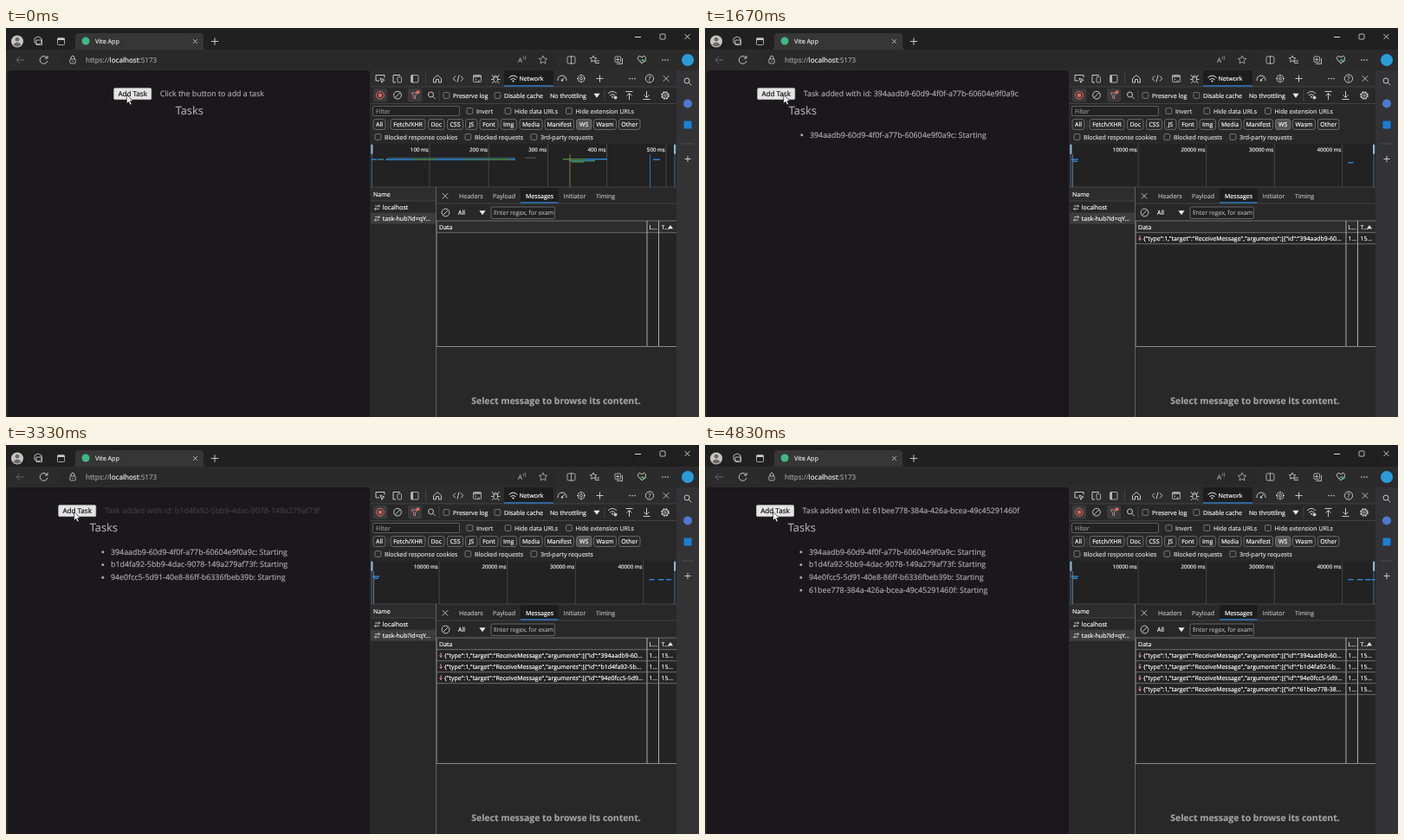
Animation, 800 px wide and 450 px high, one loop 5000 ms. Source, as an HTML page:

```html
<!DOCTYPE html>
<html lang="en">
<head>
<meta charset="utf-8">
<title>Task list with network panel</title>
<style>
  html, body { margin: 0; width: 100%; height: 100%; overflow: hidden; background: #1a181b; }
  svg { display: block; width: 100vw; height: 100vh; }
  text { font-family: "Open Sans", "Noto Sans", sans-serif; text-rendering: geometricPrecision; white-space: pre; }
</style>
</head>
<body>
<svg id="stage" viewBox="0 0 800 450">
  <g id="chrome"></g>
  <g id="live"></g>
</svg>
<script>
const BLUE = '#2b88e0', TEAL = '#3f8f8a', GREEN = '#4c8a45', LINE = '#4a4a4a', ICON = '#c8c8c8', PAGE_TEXT = '#aba9ab';

// A hairline stroke in the fill colour gives the slightly heavy look of small screen text.
const text = (x, y, s, fill = '#dcdcdc', size = 7.05, more = '') =>
  `<text x="${x}" y="${y}" fill="${fill}" stroke="${fill}" stroke-width=".18" font-size="${size}" ${more}>${s}</text>`;
const rect = (x, y, w, h, fill, stroke = 'none', r = 0) =>
  `<rect x="${x}" y="${y}" width="${w}" height="${h}" fill="${fill}" stroke="${stroke}" stroke-width=".8" rx="${r}"/>`;
const path = (d, stroke = ICON, width = 1, fill = 'none') =>
  `<path d="${d}" stroke="${stroke}" stroke-width="${width}" fill="${fill}" stroke-linejoin="round"/>`;
const dot = (x, y, r, fill = 'none', stroke = 'none', width = 1) =>
  `<circle cx="${x}" cy="${y}" r="${r}" fill="${fill}" stroke="${stroke}" stroke-width="${width}"/>`;
const hline = (x1, x2, y, color = LINE) => path(`M${x1} ${y}H${x2}`, color, .8);
const vline = (x, y1, y2, color = LINE) => path(`M${x} ${y1}V${y2}`, color, .8);
const cross = (x, y, r, color = ICON) => path(`M${x - r} ${y - r}l${2 * r} ${2 * r}m0 ${-2 * r}l${-2 * r} ${2 * r}`, color, .9);
const plus = (x, y, r) => path(`M${x - r} ${y}h${2 * r}M${x} ${y - r}v${2 * r}`);
const dots = (x, y) => [-3, 0, 3].map(d => dot(x + d, y, .85, ICON)).join('');
const checkbox = (x, y, label, color) =>
  rect(x, y - 3.4, 6.8, 6.8, 'none', '#8c8c8c', 1.2) + text(x + 11, y + 2.5, label, color);
const search = (x, y) => dot(x - 1, y - 1, 3, 'none', ICON) + path(`M${x + 1.2} ${y + 1.2}l3 3`);
const gear = (x, y) => dot(x, y, 3.9, 'none', ICON, 1.8).replace('/>', ' stroke-dasharray="2 1.06"/>')
  + dot(x, y, 3.4, 'none', ICON, .8) + dot(x, y, 1.3, 'none', ICON, .8);
const clear = (x, y) => dot(x, y, 4.4, 'none', ICON) + path(`M${x + 3} ${y - 3}l-6 6`);
const caret = (x, y) => path(`M${x - 3.6} ${y - 2.3}h7.2l-3.6 5z`, 'none', 0, '#eee');
const wifi = (x, y, color) =>
  path(`M${x - 5} ${y - 1}q5 -4.8 10 0M${x - 3} ${y + 1.2}q3 -2.8 6 0`, color, 1) + dot(x, y + 3, 1, color);

function browserFrame() {
  return rect(0, 0, 800, 450, '#2b2b2b') + rect(0, 0, 800, 25, '#202020')
    + path('M76 25q4 0 4 -4V10q0 -4 4 -4H224q4 0 4 4V21q0 4 4 4z', 'none', 0, '#363636')
    + rect(63, 28, 573, 18, '#292929', 'none', 4)
    // window and tab row
    + dot(13, 15.5, 7, '#c9c5c2') + dot(13, 13.2, 2.4, '#6c6865') + path('M8.3 19.5q4.7 -6 9.4 0q-4.7 4 -9.4 0z', 'none', 0, '#6c6865')
    + path('M33 12l4 -2 4 2v5l-4 2 -4 -2zM35 14h6.5v5.5h-6.5z', ICON, .9)
    + rect(59.5, 11.5, 8, 8, 'none', ICON, 1) + path('M59.5 13h8', ICON, 2)
    + dot(92, 15, 4.5, '#41b883') + text(103, 17.8, 'Vite App', '#e2e2e2', 7.2)
    + cross(218.5, 15.5, 2.3) + plus(241, 15.5, 4.2)
    + path('M726 10.5h7', '#ddd') + rect(755, 7, 6, 6, 'none', '#ddd', 1) + cross(786.5, 10, 3, '#ddd')
    // address row
    + path('M21 37h-9m4 -4l-4 4 4 4', '#666') + path('M47.3 34.5a4.4 4.4 0 1 0 .6 3.5M48 32v3h-3')
    + rect(73.8, 36, 6.4, 5, 'none', ICON, 1) + path('M75 36v-2q2 -3.6 4 0v2M77 38v1')
    + text(92, 40, 'https://<tspan fill="#f0f0f0" stroke="#f0f0f0">localhost</tspan>:5173', '#a0a0a0', 8.1)
    + text(591, 40, 'A', '#aaa', 8) + path('M597 33q1.4 1 0 3M599 32q2 2 0 5', '#aaa', .7)
    + path(star(620, 37, 5), '#aaa', .9)
    + rect(648, 33, 9, 8, 'none', ICON, 1.3) + vline(652.5, 32, 42, ICON)
    + path(star(678, 36, 4), ICON, .9) + path('M680 38h5m-5 2.5h5', ICON, .9)
    + rect(703, 33, 6.5, 6.5, 'none', ICON, 1) + path('M705 41.5h6.5v-6.5M706.2 34.5v4m-2 -2h4', ICON, .9)
    + path('M734 41l-4 -4.2q-1.6 -4.3 2 -4.3l2 1.5 2 -1.5q3.6 0 2 4.3z') + path('M732 38h2l1 -2 1.5 4 1 -2h2', '#5bb978', 1)
    + dots(761, 37)
    // side bar
    + rect(774, 49, 26, 401, '#333335') + dot(787, 37, 7, '#2b9bd8')
    + search(787, 62) + dot(787, 87.5, 5, '#5078d0') + rect(782.5, 107.5, 9, 9, '#1a7fd4', 'none', 1)
    + hline(780, 794, 134, '#555') + plus(787, 151.5, 3.5)
    + path('M2 450V53q0 -4 4 -4H416q4 0 4 4V450z', 'none', 0, '#1a181b');
}

function star(x, y, r) {
  const points = Array.from({ length: 10 }, (_, i) => {
    const a = i * Math.PI / 5, d = i % 2 ? r * .48 : r;
    return `${x + d * Math.sin(a)} ${y - d * Math.cos(a)}`;
  });
  return `M${points.join('L')}z`;
}

function devToolbar() {
  return rect(421, 49, 353, 401, '#282828') + rect(421, 49, 353, 19, '#2c2c2c')
    + rect(575, 49, 57, 18, '#1d1d1d') + rect(575, 66.3, 57, 1.5, BLUE) + hline(421, 774, 68)
    + path('M431 61h-4v-6.5h10v3M432 58l5 2.3 -2.2 .8 -.8 2.2z')
    + path('M447 61v-6.5h8M450 63h-3v-2') + rect(452, 56.5, 4.5, 6.5, 'none', ICON, 1)
    + rect(467.5, 54.5, 8.5, 8.5, 'none', ICON, 1) + path('M469 54.5v8.5', ICON, 1.8) + vline(484.5, 52, 65)
    + path('M493.5 58.5l4.5 -4 4.5 4v4.5h-3v-3.5h-3v3.5h-3z')
    + path('M519 55.5l-2.7 3 2.7 3M525 55.5l2.7 3 -2.7 3M523 54.5l-2 8')
    + rect(539.5, 54.5, 9, 8, 'none', ICON, 1) + path('M539.5 56h9', ICON, 1.4) + path('M541.5 58.3l1.5 1.2 -1.5 1.2M544.5 61h2.5', ICON, .8)
    + path('M563 57h4.5v4q-2.2 3.5 -4.5 0zM563 57q2.2 -4 4.5 0M561 54l2 3M569.5 54l-2 3M560 59.5h3M567.5 59.5h3M561 64l2 -2M569.5 64l-2 -2', ICON, .9)
    + wifi(585.5, 58.5, '#eee') + text(592.5, 61, 'Network', '#f8f8f8')
    + path('M637 61q0 -6 5 -6t5 6M642 60l3 -3') + dot(642, 60.5, 1.2, ICON)
    + rect(660.5, 55, 7, 7, 'none', ICON, 2) + dot(664, 58.5, 1.5, 'none', ICON) + path('M664 53.5v1.5m0 7v1.5m-5 -5h1.5m7 0h1.5')
    + plus(685.5, 58.5, 4) + dots(723, 58.5)
    + dot(743, 58.5, 4.6, 'none', ICON) + text(741.4, 61, '?', ICON, 7) + cross(762, 58.5, 3.3)
    // recording controls
    + rect(424, 70, 16, 15.5, '#3b3b3b', 'none', 2) + dot(432, 77.7, 4.4, 'none', '#e46962') + rect(430, 75.7, 4, 4, '#e46962', 'none', 1)
    + clear(452, 77.7) + rect(464, 70, 16, 15.5, '#3b3b3b', 'none', 2)
    + path('M468 75h7l-2.5 3.2v3.6l-2 -1v-2.6z', '#c98b86', .9) + dot(475.5, 74.3, 2, '#e46962')
    + search(491.5, 78) + vline(500, 71, 85)
    + checkbox(505, 78, 'Preserve log', '#f4f4f4') + checkbox(564, 78, 'Disable cache', '#f4f4f4')
    + text(628, 80.5, 'No throttling', '#f4f4f4') + caret(682, 78) + vline(691, 71, 85)
    + wifi(700, 76.8, ICON) + dot(703.5, 80.5, 2, ICON)
    + path('M715.5 73.5h8M719.5 83v-7.5m-3 3l3 -3 3 3') + path('M735.5 82.5h8M739.5 73v7.5m-3 -3l3 3 3 -3')
    + gear(761, 78) + hline(421, 774, 87.5)
    // filters
    + rect(423.5, 90.5, 100, 11, '#222', '#6b6b6b', 1.5) + text(427, 98.8, 'Filter', '#8f8f8f')
    + checkbox(532, 96, 'Invert') + checkbox(576, 96, 'Hide data URLs') + checkbox(646.5, 96, 'Hide extension URLs')
    + checkbox(426, 126, 'Blocked response cookies') + checkbox(530, 126, 'Blocked requests') + checkbox(606, 126, '3rd-party requests')
    + [['All', 424, 438], ['Fetch/XHR', 444, 484], ['Doc', 487.5, 506], ['CSS', 509.5, 527.5], ['JS', 530.5, 544],
       ['Font', 547, 568], ['Img', 571, 589.5], ['Media', 593, 619], ['Manifest', 622, 655.5], ['WS', 658.5, 676],
       ['Wasm', 678.5, 704.5], ['Other', 707.5, 732]]
      .map(([label, a, b]) => rect(a, 105.5, b - a, 12, label === 'WS' ? '#555' : '#2b2b2b', '#777', 2.5)
        + text((a + b) / 2, 114, label, '#f8f8f8', 7, 'text-anchor="middle"')).join('')
    + vline(441, 106, 118) + rect(421, 134, 353, 50, '#222');
}

function requestPanels() {
  return rect(421, 184, 75, 16, '#2d2d2d') + text(424, 194.7, 'Name', '#f8f8f8') + hline(421, 496, 200)
    + rect(421, 213.7, 75, 13, '#3d3d3d')
    + [['localhost', 207.5], ['task-hub?id=qY...', 220.3]].map(([name, y]) => text(434.8, y + 2.5, name, '#f8f8f8')
      + path(`M426 ${y - 1.6}h5.5m-1.6 -1.6l1.6 1.6 -1.6 1.6M431 ${y + 1.8}h-5.5m1.6 -1.6l-1.6 1.6 1.6 1.6`, '#ddd', .8)).join('')
    + hline(421, 774, 184) + vline(496.5, 184, 450, '#707070')
    + rect(594, 185, 43.5, 17, '#1d1d1d') + rect(594, 201.3, 43.5, 1.5, BLUE) + hline(497, 774, 203)
    + cross(507, 194.3, 3.2)
    + [['Headers', 523], ['Payload', 562], ['Messages', 600], ['Initiator', 643.5], ['Timing', 681]]
      .map(([label, x]) => text(x, 196.7, label, label === 'Messages' ? '#fff' : '#b8b8b8')).join('')
    + clear(507.5, 213.5) + text(522, 216, 'All', '#f8f8f8') + caret(550, 213.5)
    + rect(560, 207, 73.5, 13.5, '#222', '#777', 1.5) + text(563, 216, 'Enter regex, for exam', '#a8a8a8', 6.95)
    // message table
    + rect(497, 223, 277, 145, '#242424') + rect(497, 223, 277, 13.5, '#2d2d2d')
    + hline(497, 774, 223, '#808080') + hline(497, 774, 236.7, '#808080') + hline(497, 774, 368.5, '#a0a0a0')
    + vline(497.3, 223, 368, '#808080') + vline(740, 223, 368, '#d0d0d0') + vline(753.5, 223, 368, '#d0d0d0')
    + text(500, 232.7, 'Data', '#f8f8f8') + text(742.5, 232.7, 'L...', '#f8f8f8') + text(756.5, 232.7, 'T...', '#f8f8f8')
    + path('M764 232.3h6l-3 -4.3z', 'none', 0, '#eee')
    + text(635, 435, 'Select message to browse its content.', '#a0a0a0', 10.46, 'font-weight="700" text-anchor="middle"');
}

const tasks = [
  '394aadb9-60d9-4f0f-a77b-60604e9f0a9c',
  'b1d4fa92-5bb9-4dac-9078-149a279af73f',
  '94e0fcc5-5d91-40e8-86ff-b6336fbeb39b',
  '61bee778-384a-426a-bcea-49c45291460f'
];
// Times are ticks of 1/12 s: button down, task listed, status starts fading, new status shown.
const clicks = [
  { down: 6, listed: 7, fade: 8, shown: 14 },
  { down: 24, listed: 25, fade: 26, shown: 31 },
  { down: 36, listed: 37, fade: 38, shown: 44 },
  { down: 51, listed: 52, fade: 51, shown: 56 }
];
const buttonX = [125, 61, 61, 61.7, 59.8];

const ruler = document.createElement('canvas').getContext('2d');
ruler.font = '100px "Open Sans", "Noto Sans", sans-serif';

// Cuts a string at the given width in em and marks the cut.
function truncate(s, em) {
  let end = s.length;
  while (ruler.measureText(s.slice(0, end)).width > em * 100) end--;
  return `${s.slice(0, end)}...`;
}

function waterfall(count) {
  const early = count === 0;
  const lines = early ? [489, 557.2, 625.4, 693.6, 762] : [500, 578.7, 657.3, 735.7];
  const bar = (x1, x2, y, color = BLUE) => rect(x1, y, x2 - x1, 1.4, color);
  let s = lines.map((x, i) => vline(x, 134, 184, '#505050')
    + text(x - 1.2, 143, `${(i + 1) * (early ? 100 : 10000)} ms`, '#f0f0f0', 6.2, 'text-anchor="end"')).join('');
  if (early) {
    s += bar(422, 428, 151.3) + bar(429, 436, 151.3, TEAL)
      + bar(440, 588, 149.8, '#3a5a66') + bar(438, 470, 151.6) + bar(470, 496, 151.6, GREEN) + bar(496, 528, 151.6)
      + bar(528, 556, 151.6, TEAL) + bar(556, 582, 151.6, GREEN) + bar(582, 588, 151.6)
      + bar(599, 612, 149.5, '#4c4c4c')
      + bar(643, 668, 151, GREEN) + bar(668, 694, 151) + bar(650, 680, 152.9, TEAL) + bar(653, 667, 154.3, GREEN)
      + bar(747, 755, 151.5) + vline(651, 146, 184, '#a08a50') + vline(743.5, 146, 184, BLUE);
  } else {
    s += bar(423, 431, 151.4) + bar(424, 430, 153.6) + vline(424.5, 146, 184, '#7a8a98')
      + [[742.5, 748.5], [753, 759.5], [762, 768], [768.7, 773.5]].slice(0, count).map(([a, b]) => bar(a, b, 155)).join('');
  }
  return s + [421.3, 771].map(x => rect(x, 134.5, 2.2, 11.5, '#8ab8dc', 'none', 1)
    + vline(x + 1, 146, 184, '#4a80ac')).join('');
}

const messageRow = (id, i) => {
  const y = 243.3 + i * 13;
  return path(`M502 ${y - 3}v5m-1.4 -1.8l1.4 2 1.4 -2`, '#e39a94', 1)
    + text(506, y + 2.5, `{"type":1,"target":"ReceiveMessage","arguments":[{"id":"${truncate(id, 6.37)}`, '#fff', 6.97)
    + text(742.5, y + 2.5, '1...', '#f8f8f8') + text(756.5, y + 2.5, '15...', '#f8f8f8') + hline(497, 774, y + 6.4, '#808080');
};

function pointer(tick) {
  if (tick >= 15 && tick < 18) return path('M140.5 77.5h4M142.5 77.5v9M140.5 86.5h4', '#ddd', .9);
  const u = Math.min(1, Math.max(0, (tick - 17) / 5));
  const x = 139.3 - 60.8 * (1 - (1 - u) ** 1.75);
  return path(`M${x} 77.2v10.2l2.3 -2.1 1.7 3.7 1.8 -.8 -1.7 -3.6h3.2z`, '#111', .7, '#fff');
}

function page(tick, count, shown) {
  const x = buttonX[shown];
  const next = clicks[shown];
  const opacity = next ? (1 - Math.min(1, Math.max(0, (tick - next.fade) / 4))) ** 2 : 1;
  const pressed = clicks.some(c => tick >= c.down && tick < c.listed);
  const hovered = tick < 14 || tick >= 20;
  const status = shown ? `Task added with id: ${tasks[shown - 1]}` : 'Click the button to add a task';
  const left = count === 0 ? 195.7 : count === 4 ? 95.8 : 96.8;
  return rect(x - .3, 69.7, 43, 12.9, pressed ? '#f5f5f5' : hovered ? '#e5e5e5' : '#efefef', '#c4c4c4', 1)
    + text(x + 21.2, 79.1, 'Add Task', '#111', 8.1, 'text-anchor="middle"')
    + text(x + 52.8, 79.4, status, PAGE_TEXT, 8.85, `opacity="${opacity}"`)
    + text(left, 99.7, 'Tasks', PAGE_TEXT, 12.8)
    + tasks.slice(0, count).map((id, i) => dot(left + 15, 123.7 + i * 14.8, 1.5, PAGE_TEXT)
      + text(left + 24.2, 126.5 + i * 14.8, `${id}: Starting`, PAGE_TEXT, 8.85)).join('');
}

const live = document.getElementById('live');
document.getElementById('chrome').innerHTML = browserFrame() + devToolbar() + requestPanels();

let lastTick = -1;
function draw(now) {
  const tick = Math.floor(now % 5000 * 12 / 1000 + .05) % 60;
  if (tick !== lastTick) {
    lastTick = tick;
    const count = clicks.filter(c => tick >= c.listed).length;
    const shown = clicks.filter(c => tick >= c.shown).length;
    live.innerHTML = waterfall(count) + tasks.slice(0, count).map(messageRow).join('')
      + page(tick, count, shown) + pointer(tick);
  }
  requestAnimationFrame(draw);
}
draw(performance.now());
</script>
</body>
</html>
```
